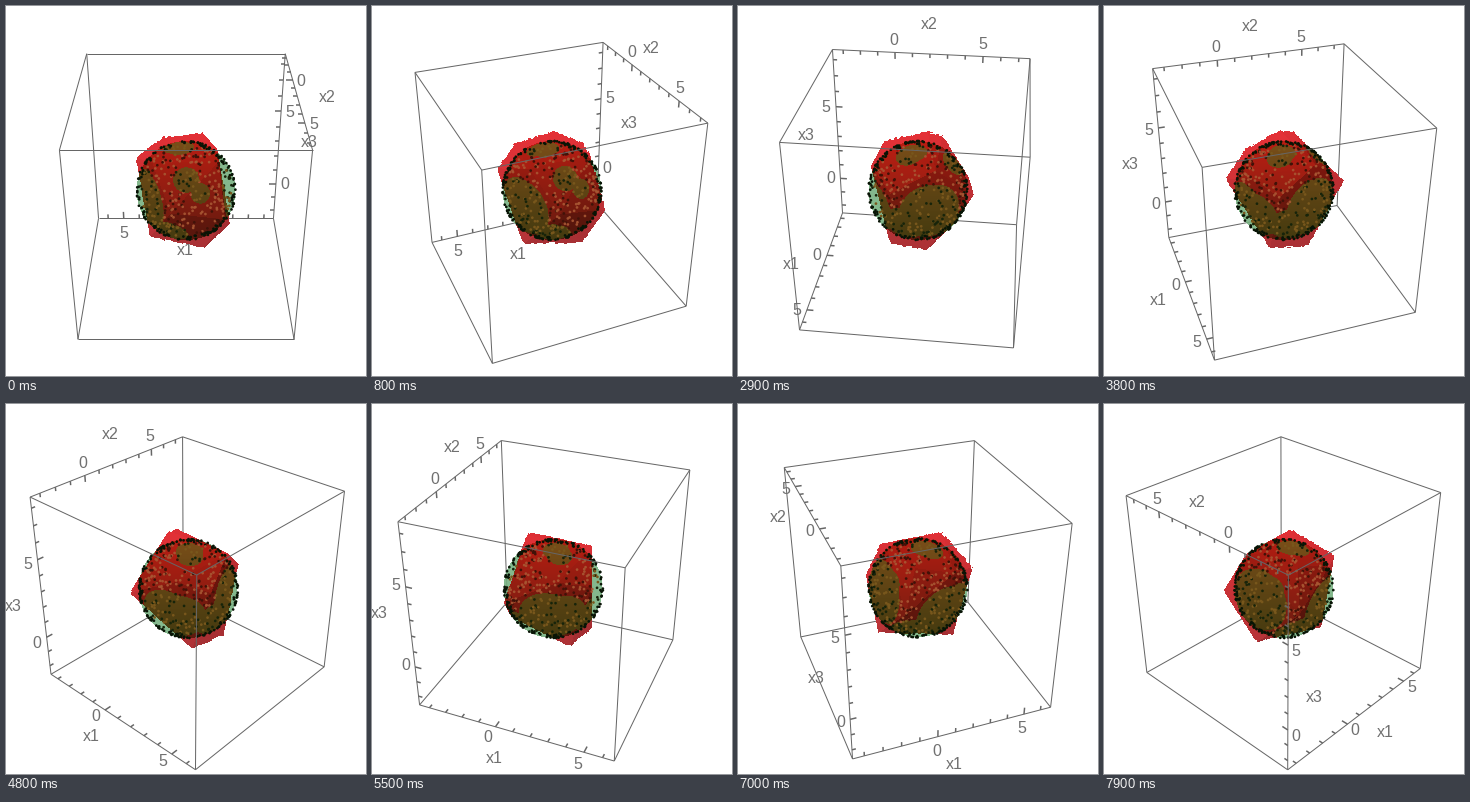
A matplotlib script that plays this animation: 360 by 370 pixels, repeating every 8000 ms.

```python
import itertools

import matplotlib.pyplot as plt
import numpy as np
from matplotlib.animation import FuncAnimation
from matplotlib.collections import LineCollection

W, H, DPI = 360, 370, 100
PX = 72 / DPI
FRAMES, STEP = 80, 0.05            # radians turned per frame
CX, CY = 180, 184.5
TILT, DIST, FOCAL = 0.558, 7.54, 780
HALF, MID = 5.62, (1, 2, 3)        # half side and centre of the plotted range
BALL_R, SOLID_R = 49.5, 61
GREY = "#666666"
BACK, BODY, DOTS, FRONT = 1, 3, 4, 6

COS, SIN = np.cos(TILT), np.sin(TILT)


def turn(p, a):
    x, t, u = np.moveaxis(np.asarray(p, float), -1, 0)
    c, s = np.cos(a), np.sin(a)
    return np.stack([x * c + t * s, t * c - x * s, u], -1)


def view(p):
    """Right, up and towards the eye."""
    x, t, u = np.moveaxis(p, -1, 0)
    return np.stack([x, u * COS - t * SIN, t * COS + u * SIN], -1)


def look(p, a):
    return view(turn(np.asarray(p, float) * (-1, 1, 1), a))


def screen(p, a):
    x, y, z = np.moveaxis(look(p, a), -1, 0)
    k = FOCAL / (DIST - z)
    return np.stack([CX + k * x, CY - k * y], -1)


def unit(v):
    return v / np.linalg.norm(v, axis=-1, keepdims=True)


def mix(a, b, t):
    return (np.array(a) + (np.array(b) - np.array(a)) * t[..., None]) / 255


def hull(points):
    """Outward normals and distances of the faces of a convex solid."""
    faces = []
    for a, b, c in itertools.combinations(points, 3):
        n = unit(np.cross(b - a, c - a))
        n *= np.sign(n @ a)
        if (points @ n <= n @ a + 1e-6).all():
            faces.append((*n, n @ a))
    faces = np.array(faces)
    return faces[:, :3], faces[:, 3]


# Tips of the red solid: azimuth in degrees and height, all on one sphere.
TIPS = [(-10, 52), (-32, 47), (65, 47), (-147, 46), (118, 37), (157, 26),
        (-105, 9), (58, 5), (-50, -5), (5, -42), (-63, -47), (-160, -47),
        (139, -48)]
azimuth, height = np.array(TIPS, float).T
azimuth = np.radians(azimuth)
ring = np.sqrt(SOLID_R ** 2 - height ** 2)
NORMALS, DISTS = hull(np.stack([ring * np.cos(azimuth),
                                -ring * np.sin(azimuth), height], -1))

rng = np.random.default_rng(4)
X0, X1, Y0, Y1 = 117, 243, 118, 250
GX, GY = np.meshgrid(np.arange(X0, X1) + .5 - CX, CY - np.arange(Y0, Y1) - .5)
R2 = GX ** 2 + GY ** 2
BALL = R2 < BALL_R ** 2
BALL_Z = np.sqrt(np.maximum(BALL_R ** 2 - R2, 0))
TONE = np.clip((GY + 60) / 120, 0, 1)
RED = mix((182, 54, 58), (226, 48, 54), TONE)
WINE = mix((100, 30, 16), (186, 28, 18), TONE)
OLIVE = mix((62, 56, 14), (128, 80, 26), TONE)
LEAF = np.array([118, 176, 128]) / 255
ROUGH = 6 * np.kron(rng.random((GX.shape[0] // 3, GX.shape[1] // 3)),
                    np.ones((3, 3)))


def render(a):
    """Colour image of ball and solid, and where red covers the ball."""
    n = view(turn(NORMALS, a))
    nx, ny, nz = (c[:, None, None] for c in n.T)
    nz = np.where(np.abs(nz) < 1e-6, 1e-6, nz)
    depth = (DISTS[:, None, None] - nx * GX - ny * GY) / nz
    ahead = np.where(nz > 0, depth, np.inf)
    near = ahead.min(0)
    far = np.where(nz < 0, depth, -np.inf).max(0)
    solid = near - far > ROUGH
    light = np.clip(.8 + .4 * (n @ (-.3, .35, .5)), .65, 1.15)
    shade = light[ahead.argmin(0)][..., None]

    covered = solid & BALL & (near > BALL_Z)
    poking = solid & BALL & ~covered
    img = np.zeros(GX.shape + (4,))
    img[BALL & ~solid] = (*LEAF, .9)
    for mask, tint in ((solid, RED * (.6 + .4 * shade)),
                       (covered, WINE * shade), (poking, OLIVE)):
        img[mask] = np.insert(tint[mask], 3, 1, axis=1)
    return np.clip(img, 0, 1), covered


SPOTS = unit(rng.normal(size=(950, 3))) * BALL_R
PALE = rng.random(len(SPOTS)) < .6

fig = plt.figure(figsize=(W / DPI, H / DPI), dpi=DPI, facecolor="white")
ax = fig.add_axes([0, 0, 1, 1])
ax.axis("off")
body = ax.imshow(np.zeros(GX.shape + (4,)), extent=(X0, X1, Y1, Y0),
                 aspect="auto", interpolation="nearest", zorder=BODY)
dots = ax.scatter(np.zeros(len(SPOTS)), np.zeros(len(SPOTS)),
                  s=(2.7 * PX) ** 2, linewidths=0, zorder=DOTS)

CORNERS = np.array(list(itertools.product((-1, 1), repeat=3)))
EDGES = np.array([(p, q) for p, q in itertools.combinations(CORNERS, 2)
                  if np.abs(p - q).sum() == 2])


def lines(width):
    c = LineCollection([], colors=GREY, linewidths=width * PX)
    ax.add_collection(c, autolim=False)
    return c


def label(s):
    return ax.text(0, 0, s, family="Liberation Sans", size=16 * PX,
                   color="#707070", ha="center", va="baseline")


class Axis:
    def __init__(self, i, base):
        self.base = np.array(base, float)
        self.along = np.eye(3)[i]
        self.outs = [np.diag(self.base)[j] for j in (2, 1, 0) if j != i]
        self.values = np.arange(MID[i] - 5, MID[i] + 6)
        self.points = self.base + np.outer((self.values - MID[i]) / HALF,
                                           self.along)
        self.ticks = lines(1.5)
        self.numbers = {v: label(str(v)) for v in (0, 5)}
        self.name = label(f"x{i + 1}")

    def heading(self, p, v, a):
        return unit(screen(p + .05 * v, a) - screen(p, a))

    def place(self, text, pos, d, rx, ry, z):
        x, y = pos + d / np.hypot(d[0] / rx, d[1] / ry)
        text.set_position((x - .7, y + 5.7))
        text.set_zorder(z)
        return x, y

    def update(self, a):
        """Place ticks and labels; returns the label centres."""
        # labels leave along the box direction most square to the axis
        run = self.heading(self.base, self.along, a)
        out = min(self.outs, key=lambda o: round(
            abs(self.heading(self.base, o, a) @ run), 2))
        z = FRONT if look(self.base, a)[2] > 0 else BACK
        at = screen(self.points, a)
        d = self.heading(self.points, out, a)
        size = np.where(self.values % 5 == 0, 6.5, 4)[:, None]
        self.ticks.set_segments(np.stack([at, at - d * size], 1))
        self.ticks.set_zorder(z)
        spots = [self.place(text, at[k], d[k], 9.2, 13.5, z)
                 for v, text in self.numbers.items()
                 for k in [v - self.values[0]]]
        spots.append(self.place(self.name, screen(self.base, a),
                                self.heading(self.base, out, a), 31, 31, z))
        return spots


back, front = lines(1), lines(1)
back.set_zorder(BACK)
front.set_zorder(FRONT)
axes = [Axis(0, (0, -1, -1)), Axis(1, (-1, 0, 1)), Axis(2, (-1, -1, 0))]


def draw_dots(a, covered):
    x, y, z = view(turn(SPOTS, a)).T
    sx, sy = CX + x, CY - y
    under = covered[(sy - Y0).astype(int), (sx - X0).astype(int)]
    rim = np.hypot(x, y) > .93 * BALL_R
    colors = np.tile([.09, .14, .04, 1.0], (len(SPOTS), 1))
    colors[PALE] = (.47, .34, .11, 1)
    colors[under] = (.25, .07, .03, 1)
    colors[under & PALE] = (.66, .34, .2, .9)
    colors[rim] = (.03, .08, .02, 1)
    colors[z < 0, 3] = 0
    dots.set_offsets(np.stack([sx, sy], -1))
    dots.set_facecolors(colors)


def draw(k):
    a = k * STEP
    segs = screen(EDGES, a)
    near = look(EDGES.mean(1), a)[:, 2] > 0
    back.set_segments(segs[~near])
    front.set_segments(segs[near])

    # pan just enough to keep every label on the stage
    spots = np.array([s for axis in axes for s in axis.update(a)])
    dx = max(0, 7.5 - spots[:, 0].min())
    dy = min(0, 359 - spots[:, 1].max())
    ax.set_xlim(-dx, W - dx)
    ax.set_ylim(H - dy, -dy)

    img, covered = render(a)
    body.set_data(img)
    draw_dots(a, covered)
    return []


anim = FuncAnimation(fig, draw, frames=FRAMES, interval=100, repeat=True,
                     repeat_delay=0, blit=False)
plt.show()
```
